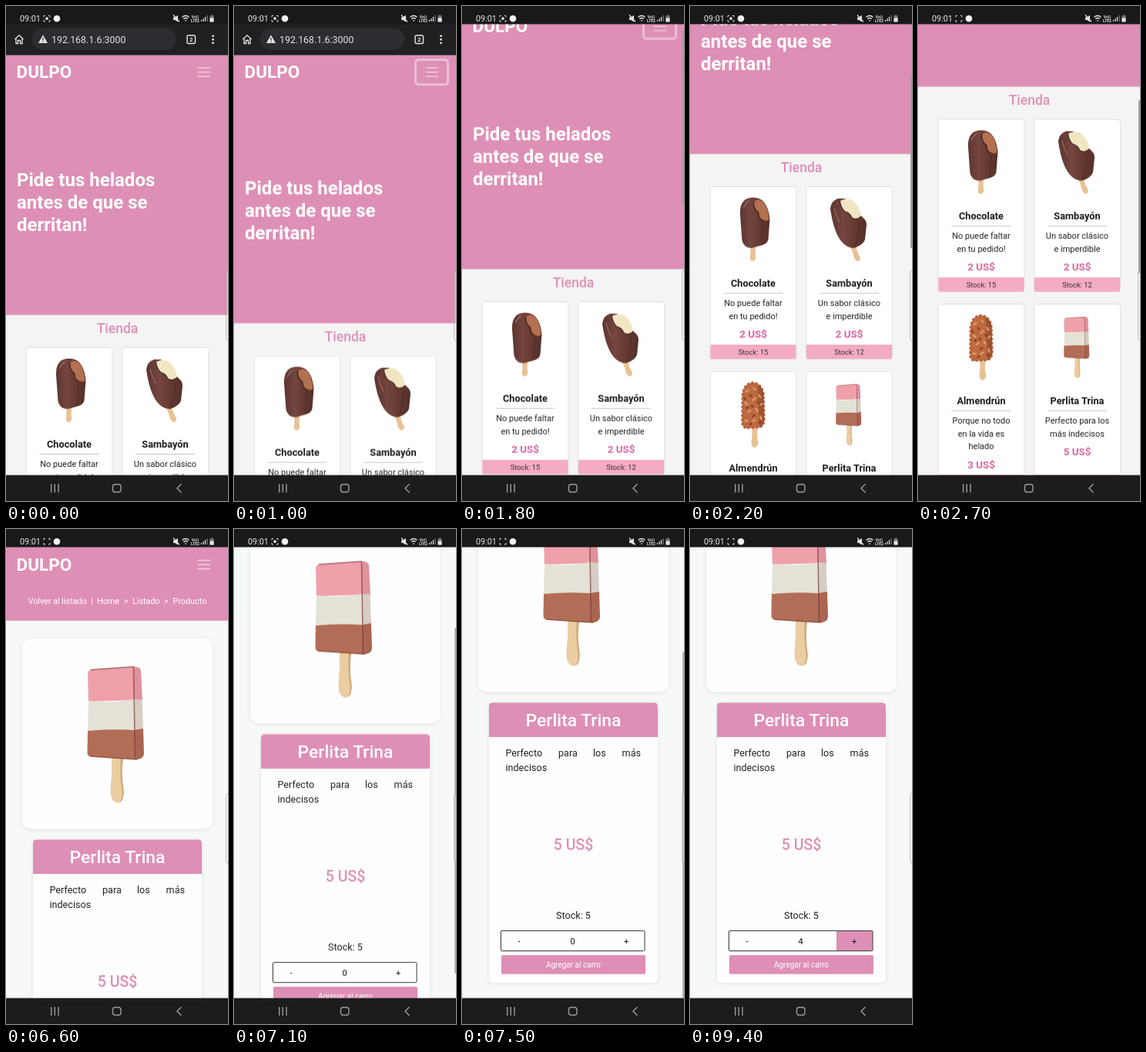
An HTML page for the animation above (9500 ms loop, 288 px wide and 640 px high).

```html
<!DOCTYPE html>
<html lang="es">
<head>
<meta charset="utf-8">
<title>Heladería</title>
<style>
  html, body { margin: 0; width: 100%; height: 100%; overflow: hidden; background: #1b1b1d; }
  svg { display: block; }
  text { font-family: Roboto, sans-serif; }
  .mid text, .mid { text-anchor: middle; }
  .pink { fill: #de8fb5; }
  .white { fill: #fff; }
  .brand { font-size: 22.5px; font-weight: 700; fill: #fff; }
  .hero { font-size: 24px; font-weight: 700; fill: #fff; }
  .crumb { font-size: 10.8px; fill: #fff; }
  .name { font-size: 12.75px; font-weight: 700; fill: #1c1c1c; }
  .desc { font-size: 11px; fill: #222; }
  .price { font-size: 13.4px; font-weight: 700; fill: #d9669f; }
  .stock { font-size: 9.4px; fill: #333; }
  .body { font-size: 12.6px; fill: #222; }
  .num { font-size: 11px; fill: #111; }

  .anim { animation: 9.5s linear infinite; }
  .step { animation: 9.5s step-end infinite; }
  .blink { animation-name: blink; }
  .ring { animation-name: ring; }
  .list { animation-name: list; }
  .load { animation-name: load; }
  .detail { animation-name: detail; }
  .menu { animation-name: menu; animation-timing-function: ease; }
  .scroll { animation-name: scroll; }
  .url { animation-name: url; }
  .thumb { animation-name: thumb; }
  .scroll2 { animation-name: scroll2; }
  .thumb2 { animation-name: thumb2; }
  .count { animation-name: count; }
  .press { animation-name: press; }

  @keyframes blink {
    0%, 8.42%, 18.94%, 29.47%, 40%, 50.52%, 61.05%, 71.57%, 82.1%, 92.63% { opacity: 1; }
    3.15%, 13.68%, 24.21%, 34.73%, 45.26%, 55.78%, 66.31%, 76.84%, 87.36%, 97.89% { opacity: 0; }
  }
  @keyframes ring { 0% { opacity: 0; } 1.05%, 100% { opacity: 1; } }
  @keyframes list { 0% { opacity: 1; } 36.84%, 100% { opacity: 0; } }
  @keyframes load { 0% { opacity: 0; } 36.84% { opacity: 1; } 60%, 100% { opacity: 0; } }
  @keyframes detail { 0% { opacity: 0; } 60%, 100% { opacity: 1; } }
  @keyframes menu {
    0%, 1.05%, 12.1%, 100% { transform: translateY(0); }
    4.74%, 8.42% { transform: translateY(80px); }
  }
  @keyframes scroll {
    0%, 15.79% { transform: translateY(0); }
    18.95% { transform: translateY(-59px); }
    24.21% { transform: translateY(-245px); }
    26.32% { transform: translateY(-257px); }
    28.42% { transform: translateY(-295px); }
    31.58% { transform: translateY(-342px); }
    35.79%, 100% { transform: translateY(-360px); }
  }
  @keyframes url {
    0%, 15.79% { transform: translateY(0); }
    17.93%, 100% { transform: translateY(-41px); }
  }
  @keyframes thumb {
    0%, 15.79% { transform: translateY(0); opacity: 0; }
    16.3% { opacity: 1; }
    18.95% { transform: translateY(8px); }
    24.21% { transform: translateY(79px); }
    28.42% { transform: translateY(98px); }
    34% { opacity: 1; }
    35.79%, 100% { transform: translateY(123px); opacity: 0; }
  }
  @keyframes scroll2 {
    0%, 71.58% { transform: translateY(0); animation-timing-function: cubic-bezier(.3, .1, .3, 1); }
    77.89%, 100% { transform: translateY(-177px); }
  }
  @keyframes thumb2 {
    0%, 71.58% { transform: translateY(0); opacity: 0; animation-timing-function: cubic-bezier(.3, .1, .3, 1); }
    72.2% { opacity: 1; }
    77.89% { transform: translateY(136px); }
    82.1% { opacity: 1; }
    85.26%, 100% { transform: translateY(136px); opacity: 0; }
  }
  @keyframes count {
    0% { transform: translateY(0); }
    92.63% { transform: translateY(-30px); }
    94.73% { transform: translateY(-60px); }
    96.84% { transform: translateY(-90px); }
    98.94%, 100% { transform: translateY(-120px); }
  }
  @keyframes press { 0% { opacity: 0; } 92.63%, 100% { opacity: 1; } }
</style>
</head>
<body>
<svg width="288" height="640" viewBox="0 0 288 640">
  <defs>
    <filter id="soft" x="-10%" y="-10%" width="120%" height="120%">
      <feDropShadow dx="0" dy="1" stdDeviation="2.5" flood-opacity=".1"/>
    </filter>
    <linearGradient id="choco">
      <stop offset="0" stop-color="#5c342f"/><stop offset=".35" stop-color="#74463f"/><stop offset=".7" stop-color="#63382f"/><stop offset="1" stop-color="#53302b"/>
    </linearGradient>
    <g id="burger" fill="none" stroke="#fff" stroke-opacity=".55" stroke-width="1.4">
      <path d="M248.500 80H265M248.500 85.500H265M248.500 91H265"/>
    </g>
    <g id="triple">
      <path d="M137 294H152Q149 315 152.500 336Q153.500 353 144.500 354Q135 353 135.500 336Q138 315 137 294Z" fill="#ebcda2"/>
      <path d="M149 297Q147 316 150.500 338Q151.500 350 146 354Q153.500 352 152.500 337Q149 315 152 297Z" fill="#cfa97a"/>
      <path d="M106 187Q106 183 110 182L166 178Q174 178 175 183L177 221 107 223Z" fill="#efa0aa"/>
      <path d="M107 222Q135 226 166 220L177 221 178 260 106 262Z" fill="#e4e2d7"/>
      <path d="M106 261Q135 258 166 260L178 258 179 291Q178 297 170 298L109 294Q105 293 105.500 288Z" fill="#b26d56"/>
      <path d="M166 178Q174 178 175 183L179 291Q178 297 170 298L167 297Z" fill="#5a1f20" opacity=".1"/>
      <path d="M165.500 179L167.500 297M110 182L166 178" fill="none" stroke="#7c3a36" stroke-width="1.6" opacity=".65"/>
      <path d="M109 294L170 298" stroke="#6d3528" stroke-width="1.5" opacity=".6"/>
    </g>
    <g id="card">
      <rect x=".5" y=".5" width="112" height="223" rx="3.500" fill="#fff" stroke="#dfdfdf"/>
      <path d="M18 138.500H95" stroke="#c9c9c9"/>
      <rect x="1" y="205" width="111" height="18.500" fill="#f4abc4"/>
    </g>
    <g id="tall">
      <rect x=".5" y=".5" width="112" height="239" rx="3.500" fill="#fff" stroke="#dfdfdf"/>
      <path d="M18 138.500H95" stroke="#c9c9c9"/>
      <rect x="1" y="221" width="111" height="18.500" fill="#f4abc4"/>
    </g>
    <g id="head">
      <rect y="23" width="288" height="95.500" class="pink"/>
      <text x="13.500" y="54" class="brand">DULPO</text>
      <use href="#burger" y="-39.500"/>
      <g class="crumb">
        <text x="28.500" y="97.300">Volver al listado</text>
        <text x="110" y="97.300">|</text>
        <text x="118" y="97.300">Home</text>
        <text x="153" y="97.300">&gt;</text>
        <text x="164" y="97.300">Listado</text>
        <text x="205" y="97.300">&gt;</text>
        <text x="216.500" y="97.300">Producto</text>
      </g>
    </g>
  </defs>

  <!-- shop -->
  <g class="step list">
    <rect width="288" height="640" fill="#f4f4f4"/>
    <g class="anim scroll">
      <g class="anim menu">
        <rect y="-60" width="288" height="459.500" class="pink"/>
        <g class="hero">
          <text x="14" y="233">Pide tus helados</text>
          <text x="14" y="261.800">antes de que se</text>
          <text x="14" y="290.600">derritan!</text>
        </g>
        <text x="144.500" y="423.300" class="mid pink" font-size="17.500" font-weight="500">Tienda</text>

        <g class="mid" transform="translate(25.500 441)">
          <use href="#card"/>
          <path d="M51.500 76H60.500Q58 86 60 92Q59 97 55.500 97Q52 97 52.500 91Q54 85 51.500 76Z" fill="#e8c294"/>
          <path d="M39.500 36Q39 20 49 16Q58 13 66 17Q76 23 78 43L76 69Q75 74 69 76L55 80Q44 80 42 70Z" fill="url(#choco)"/>
          <path d="M58 20Q62 16 67 19Q75 23 77 43Q75 46 70 44Q64 42 64 34Q57 29 58 20Z" fill="#b4714f"/>
          <path d="M57 20Q56 29 63 34Q63 43 70 45" fill="none" stroke="#472520" stroke-width="1.300"/>
          <path d="M69 47L67 75" stroke="#3b201d" opacity=".5"/>
          <path d="M44 28Q46 22 51 19" fill="none" stroke="#a37c72" stroke-width="1.500" opacity=".7"/>
          <text x="56.500" y="129.500" class="name">Chocolate</text>
          <g class="desc"><text x="56.500" y="155">No puede faltar</text><text x="56.500" y="171.700">en tu pedido!</text></g>
          <text x="56.500" y="196" class="price">2 US$</text>
          <text x="56.500" y="217.800" class="stock">Stock: 15</text>
        </g>

        <g class="mid" transform="translate(150 441)">
          <use href="#card"/>
          <path d="M57 78L65 75Q66 85 71 92Q71 97 67 97Q63 95 62 89Q61 83 57 78Z" fill="#e8c294"/>
          <path d="M32 29Q33 19 42 16L51 16 72 39Q79 43 79 50L77 69Q75 76 63 80Q53 80 46 71Q36 58 32 29Z" fill="url(#choco)"/>
          <path d="M45 19Q53 15 60 18Q70 25 72 38Q67 44 60 41Q57 34 51 33Q46 27 45 19Z" fill="#f1e6c2"/>
          <path d="M44 18Q45 28 51 33Q57 34 60 41Q67 45 73 39" fill="none" stroke="#54302a" stroke-width="1.400"/>
          <path d="M70 47Q69 65 64 78" fill="none" stroke="#3b201d" opacity=".5"/>
          <path d="M37 28Q39 38 44 47" fill="none" stroke="#a37c72" stroke-width="1.500" opacity=".6"/>
          <text x="56.500" y="129.500" class="name">Sambayón</text>
          <g class="desc"><text x="56.500" y="155">Un sabor clásico</text><text x="56.500" y="171.700">e imperdible</text></g>
          <text x="56.500" y="196" class="price">2 US$</text>
          <text x="56.500" y="217.800" class="stock">Stock: 12</text>
        </g>

        <g class="mid" transform="translate(25.500 680)">
          <use href="#tall"/>
          <path d="M54 72H63Q60 83 63 92Q62 99 58 99Q54 98 54 92Q56 83 54 72Z" fill="#e8c294"/>
          <path d="M42.500 31Q44 16 56 15Q68 16 70 30L71 64Q70 71 65 73L47 74Q42 72 42 66Z" fill="#bd6a40" stroke="#b0603a" stroke-width="2.600" stroke-linecap="round" stroke-dasharray="1 4.500"/>
          <path d="M62 18Q69 20 70 30L71 64Q70 71 65 73Z" fill="#8a4425" opacity=".6"/>
          <g fill="none" stroke-linecap="round">
            <path d="M47 27l3-2M57 22l2 2M46 41l3 2M56 38l3-3M64 31l2 3M50 53l3-2M60 49l2 3M46 64l3 1M56 65l3-2M66 59l1 3M66 44l2-2" stroke="#df9a6a" stroke-width="2.400"/>
            <path d="M52 31l2 2M48 48l2-1M58 57l-2 2M62 40l1 2M52 69l2-1M64 67l2-1M45 35l1 2M54 45l2 1" stroke="#7f3c22" stroke-width="2"/>
          </g>
          <text x="56.500" y="129.500" class="name">Almendrún</text>
          <g class="desc"><text x="56.500" y="155">Porque no todo</text><text x="56.500" y="171.700">en la vida es</text><text x="56.500" y="188.400">helado</text></g>
          <text x="56.500" y="212.500" class="price">3 US$</text>
          <text x="56.500" y="233.800" class="stock">Stock: 10</text>
        </g>

        <g class="mid" transform="translate(150 680)">
          <use href="#tall"/>
          <use href="#triple" transform="translate(-8.300 -63) scale(.45)"/>
          <text x="56.500" y="129.500" class="name">Perlita Trina</text>
          <g class="desc"><text x="56.500" y="155">Perfecto para los</text><text x="56.500" y="171.700">más indecisos</text></g>
          <text x="56.500" y="196" class="price">5 US$</text>
          <text x="56.500" y="233.800" class="stock">Stock: 5</text>
        </g>

        <use href="#card" x="25.500" y="935"/>
        <use href="#card" x="150" y="935"/>
      </g>
      <text x="13.500" y="93" class="brand">DULPO</text>
      <use href="#burger"/>
      <rect x="235.500" y="69.500" width="42" height="32" rx="4" fill="none" stroke="#fff" stroke-opacity=".42" stroke-width="3" class="step ring"/>
    </g>
    <rect x="286" y="24" width="2" height="224" fill="#a39ca0" class="anim thumb"/>

    <!-- address bar -->
    <g class="anim url">
      <rect y="22" width="288" height="41.500" fill="#1f2022"/>
      <rect x="34" y="29" width="187" height="28" rx="14" fill="#2c2d30"/>
      <path d="M11.500 43L17 37.800 22.500 43M13 42V48.500H15.500V44.500H18.500V48.500H21V42" fill="none" stroke="#e6e6e6" stroke-width="1.300"/>
      <path d="M48 37.500L54 48H42Z" fill="#e6e6e6"/>
      <path d="M48 41V44.500M48 45.500V46.800" stroke="#2c2d30" stroke-width="1.200"/>
      <text x="59" y="47.500" font-size="12.400" fill="#e3e3e3">192.168.1.6:3000</text>
      <rect x="235" y="38" width="10.500" height="10.500" rx="2" fill="none" stroke="#e6e6e6" stroke-width="1.400"/>
      <text x="240.200" y="46.200" class="mid" font-size="8" font-weight="700" fill="#e6e6e6">2</text>
      <g fill="#e6e6e6"><circle cx="268.500" cy="38.800" r="1.400"/><circle cx="268.500" cy="43.300" r="1.400"/><circle cx="268.500" cy="47.800" r="1.400"/></g>
    </g>
  </g>

  <!-- loading -->
  <g class="step load">
    <rect width="288" height="640" fill="#f3f3f3"/>
    <use href="#head"/>
    <path d="M144 298Q152 299 152.500 306Q160 307 160 314Q161 317 159 319Q167 321 167 328Q167 336 160 336H129Q122 335 122 328Q122 321 129 319.500Q126 311 134 308.500Q132 304 138 303.500Q144 303 144 298Z" fill="#ec6699"/>
    <g fill="none" stroke="#ec6699" stroke-width="2.400" stroke-linejoin="round">
      <rect x="124.500" y="337" width="39.500" height="6.500" rx="2"/>
      <path d="M127.500 343.500L128.500 351.500H160L161 343.500M131 351.500L134 379Q134.300 381 136 381H152.500Q154.300 381 154.600 379L158 351.500"/>
    </g>
    <text x="144.500" y="411" class="mid pink" font-size="19.400" font-weight="500">Cargando...</text>
  </g>

  <!-- product -->
  <g class="step detail">
    <rect width="288" height="640" fill="#f7f9f8"/>
    <g class="anim scroll2">
      <use href="#head"/>
      <rect x="21" y="141.500" width="247" height="246" rx="12" fill="#fefefe" filter="url(#soft)"/>
      <use href="#triple"/>
      <rect x="35" y="401.500" width="219" height="362" rx="5" fill="#fefefe" filter="url(#soft)"/>
      <path d="M35 446V406.500Q35 401.500 40 401.500H249Q254 401.500 254 406.500V446Z" class="pink"/>
      <text x="144.500" y="431.500" class="mid white" font-size="22.900" font-weight="500">Perlita Trina</text>
      <g class="body">
        <text x="56.500" y="471">Perfecto</text>
        <text x="125" y="471">para</text>
        <text x="170" y="471">los</text>
        <text x="232" y="471" text-anchor="end">más</text>
        <text x="56.500" y="490">indecisos</text>
      </g>
      <text x="144.500" y="591.500" class="mid pink" font-size="19.500" font-weight="500">5 US$</text>
      <text x="144.500" y="680.500" class="mid body">Stock: 5</text>
      <rect x="190" y="696.500" width="47" height="26" class="pink step press"/>
      <rect x="50.500" y="696.500" width="186.500" height="26" rx="1.500" fill="none" stroke="#3a3a3a"/>
      <g class="mid num">
        <text x="74" y="713.500">-</text>
        <text x="213" y="713.500">+</text>
        <svg x="120" y="698" width="47" height="23" overflow="hidden">
          <g class="step count">
            <text x="23.500" y="15.700">0</text><text x="23.500" y="45.700">1</text><text x="23.500" y="75.700">2</text><text x="23.500" y="105.700">3</text><text x="23.500" y="135.700">4</text>
          </g>
        </svg>
      </g>
      <rect x="51" y="728" width="187" height="24.500" rx="1.500" class="pink"/>
      <text x="144.500" y="743.700" class="mid white" font-size="10">Agregar al carro</text>
    </g>
    <rect x="286" y="23" width="2" height="447" fill="#b3b3b3" class="anim thumb2"/>
  </g>

  <!-- edge handle -->
  <path d="M289 342H287.500Q285.500 342 285.500 345V429Q285.500 432 287.500 432H289Z" fill="#eee" fill-opacity=".35" stroke="#999" stroke-opacity=".7" stroke-width=".8"/>

  <!-- status bar -->
  <rect width="288" height="23.500" fill="#19191b"/>
  <text x="18" y="20.300" font-size="10.800" fill="#e8e8e8">09:01</text>
  <path d="M49 14.500V12.500H51M55 12.500H57V14.500M57 18V20H55M51 20H49V18" fill="none" stroke="#d8d8d8"/>
  <circle cx="53" cy="16.200" r="1.900" fill="#d8d8d8" class="step blink"/>
  <circle cx="66" cy="16.300" r="4.300" fill="#f2f2f2"/>
  <g fill="none" stroke="#e2e2e2" stroke-width="1.200">
    <path d="M217 14.500H219L223 12V20.500L219 18H217Z" fill="#e2e2e2" stroke="none"/>
    <path d="M217 11.500L225 20.500"/>
    <path d="M228.500 14.500Q233 10.500 237.500 14.500M230.300 16.700Q233 14.300 235.700 16.700"/>
    <path d="M233 18V20M253.500 20V18M256 20V16M258.500 20V14"/>
    <path d="M261 20V12" opacity=".5"/>
  </g>
  <g class="mid" font-size="5" font-weight="700" fill="#e2e2e2"><text x="245.500" y="15.500">Vo))</text><text x="245.500" y="20.500">LTE2</text></g>
  <path d="M265.800 11.500H268.200V12.500H269.500V20.500H264.500V12.500H265.800Z" fill="#777"/>
  <rect x="264.500" y="15.500" width="5" height="5" fill="#e6e6e6"/>

  <!-- system navigation -->
  <rect y="606.500" width="288" height="34" fill="#1c1c1e"/>
  <g fill="none" stroke="#9c9c9c" stroke-width="1.400">
    <path d="M58.700 618V629M63.300 618V629M68 618V629M227.500 618L222 623.500 227.500 629"/>
    <rect x="138.500" y="618.500" width="10.500" height="10" rx="3"/>
  </g>
</svg>
</body>
</html>
```
